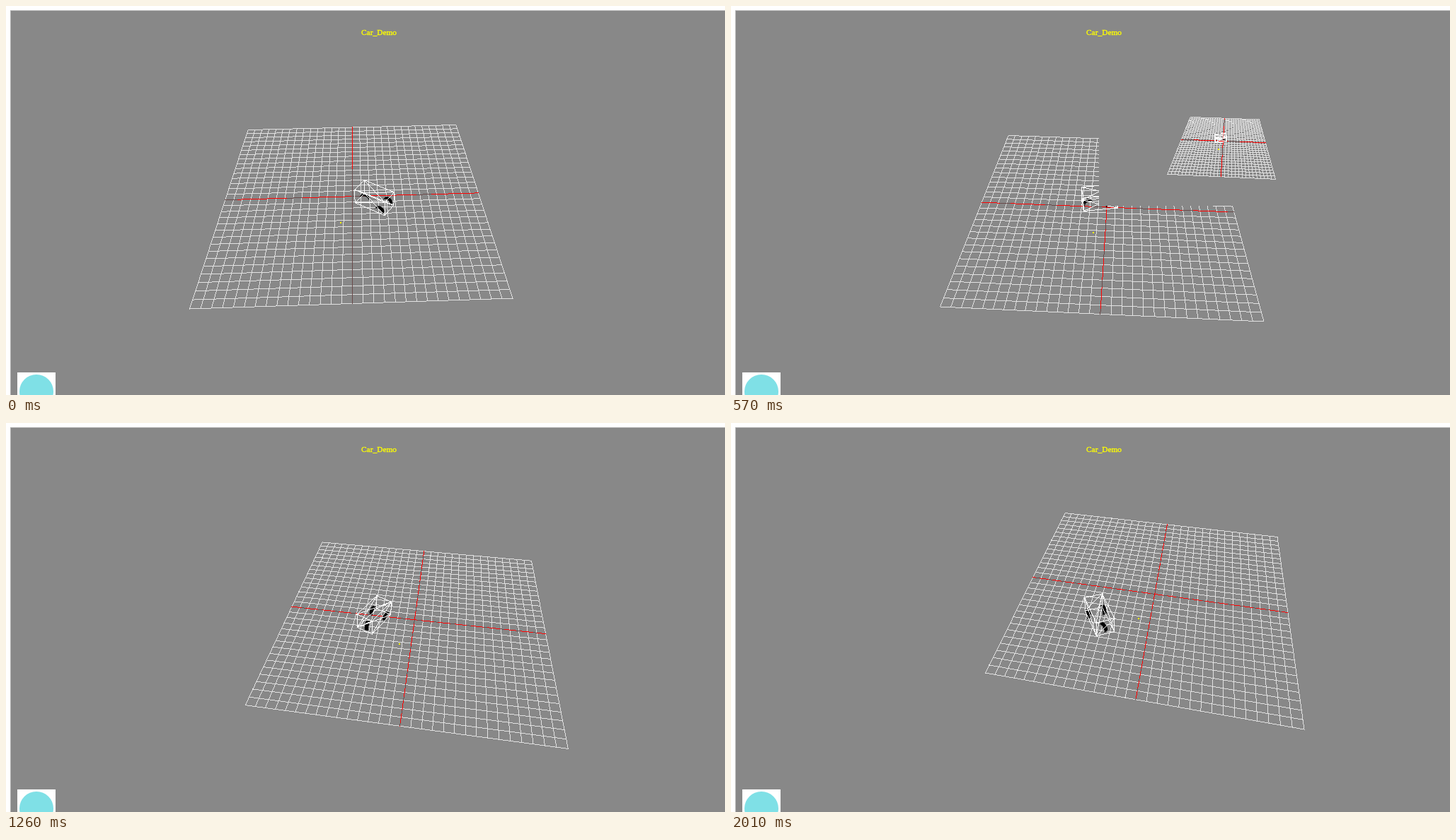
These frames come from a looping animation (1016 px wide and 551 px high, 2.04 s). An HTML page with a canvas:

```html
<!DOCTYPE html>
<html lang="en">
<head>
<meta charset="utf-8">
<title>Car_Demo</title>
<style>
  html, body { margin: 0; width: 100%; height: 100%; overflow: hidden; background: #fff; }
  canvas { display: block; }
</style>
</head>
<body>
<canvas id="stage" width="1016" height="551"></canvas>
<script>
const ctx = document.getElementById('stage').getContext('2d');
const LOOP = 2040, STEP = 30, HALF = 15;
const GREY = '#888', WHITE = '#fff', PALE = '#e2e2e2', RED = '#f00', DIM = '#6a4a4a';
const FOCAL = 594, CX = 520, CY = 283;
const INSET = { from: 570, to: 1260, x: 520, y: 98, w: 343, h: 185 };

// time, then ground corners: far left, far right, near right, near left
const KEYS = [
  [0,    341.5, 175, 635.5, 168, 715.5, 413.5, 259, 428.5],
  [360,  370.5, 182, 661.5, 184, 737.5, 435.5, 279, 430.5],
  [570,  391.5, 183, 683.5, 193, 752.5, 446.5, 295, 425.5],
  [1080, 433.5, 174, 730.5, 197, 784.5, 459.5, 328, 407.5],
  [1440, 457.5, 161, 751.5, 190, 801.5, 459.5, 346, 389.5],
  [1770, 470.5, 142, 769.5, 176, 810.5, 447.5, 358, 368.5],
  [2010, 471.5, 127, 771.5, 161, 809.5, 433.5, 359, 353.5]
];

function slope(i, c) {
  const a = KEYS[Math.max(i - 1, 0)], b = KEYS[Math.min(i + 1, KEYS.length - 1)];
  return (b[c] - a[c]) / (b[0] - a[0]);
}

// Hermite curve through the keys
function cornersAt(t) {
  let i = 0;
  while (i < KEYS.length - 2 && t >= KEYS[i + 1][0]) i++;
  const a = KEYS[i], b = KEYS[i + 1], span = b[0] - a[0];
  const s = Math.min(1, (t - a[0]) / span), r = 1 - s;
  return a.slice(1).map((v, k) => {
    const c = k + 1;
    return v * (1 + 2 * s) * r * r + b[c] * s * s * (3 - 2 * s)
      + span * (slope(i, c) * s * r * r - slope(i + 1, c) * s * s * r);
  });
}

const cross = (a, b) => [
  a[1] * b[2] - a[2] * b[1], a[2] * b[0] - a[0] * b[2], a[0] * b[1] - a[1] * b[0]
];
const toCamera = ([x, y, w]) => [(x - CX * w) / FOCAL, (y - CY * w) / FOCAL, w];
const toScreen = ([x, y, z]) => [x * FOCAL + CX * z, y * FOCAL + CY * z, z];

// Camera from the four corners; the up vector is normal to the ground
function makeCamera([x0, y0, x1, y1, x2, y2, x3, y3]) {
  const sx = x0 - x1 + x2 - x3, sy = y0 - y1 + y2 - y3;
  const ax = x1 - x2, ay = y1 - y2, bx = x3 - x2, by = y3 - y2;
  const det = ax * by - bx * ay;
  const g = (sx * by - bx * sy) / det, h = (ax * sy - sx * ay) / det;
  const size = 2 * HALF;
  const u = [x1 - x0 + g * x1, y1 - y0 + g * y1, g].map(n => n / size);
  const v = [x3 - x0 + h * x3, y3 - y0 + h * y3, h].map(n => n / size);
  const cv = toCamera(v);
  const up = toScreen(cross(cv, toCamera(u)).map(n => n / Math.hypot(...cv)));
  const base = [x0, y0, 1];

  const project = (gx, gy, z = 0) => {
    const [x, y, w] = base.map((n, k) => n + u[k] * (gx + HALF) + v[k] * (gy + HALF) + up[k] * z);
    return [x / w, y / w];
  };
  // ground point under a screen point
  const ground = (x, y) => {
    const row = (k, p) => [u[k] - p * u[2], v[k] - p * v[2], p - base[k]];
    const [a, b, e] = row(0, x), [c, d, f] = row(1, y), k = a * d - b * c;
    return [(e * d - b * f) / k - HALF, (a * f - e * c) / k - HALF];
  };
  return { project, ground };
}

// Hard-edged line, drawn in runs; ink may depend on the minor coordinate
function line(p, q, ink = () => WHITE) {
  const steep = Math.abs(q[1] - p[1]) > Math.abs(q[0] - p[0]);
  const m = steep ? 1 : 0, n = 1 - m;
  if (p[m] > q[m]) [p, q] = [q, p];
  const from = Math.round(p[m]), to = Math.round(q[m]);
  const k = (q[n] - p[n]) / (q[m] - p[m] || 1);
  let start = from, row = null, color = null;
  const flush = end => {
    if (row === null) return;
    ctx.fillStyle = color;
    if (steep) ctx.fillRect(row, start, 1, end - start);
    else ctx.fillRect(start, row, end - start, 1);
  };
  for (let i = from; i <= to; i++) {
    const pos = p[n] + (i - p[m]) * k, r = Math.round(pos), c = ink(pos);
    if (r !== row || c !== color) {
      flush(i);
      start = i; row = r; color = c;
    }
  }
  flush(to + 1);
}

const gridInk = () => PALE;
const axisInk = pos => {
  const f = pos % 2.5;
  return f > 1.15 && f < 1.75 ? DIM : RED;
};

function drawGrid(at) {
  for (let i = -HALF; i <= HALF; i++) {
    if (!i) continue;
    line(at(i, -HALF), at(i, HALF), gridInk);
    line(at(-HALF, i), at(HALF, i), gridInk);
  }
  line(at(-HALF, 0), at(HALF, 0), axisInk);
  line(at(0, -HALF), at(0, HALF), axisInk);
}

// Open tyre: only the outer wall that faces the viewer is filled
function drawWheel(at, along, side, turn) {
  const R = 0.55, W = 0.22, N = 14, c = Math.cos(turn), s = Math.sin(turn);
  const rim = (i, w) => {
    const a = i / N * 2 * Math.PI, r = R * Math.cos(a);
    return at(along + r * c - w * s, side + r * s + w * c, R + R * Math.sin(a));
  };
  ctx.fillStyle = '#000';
  ctx.beginPath();
  for (let i = 0; i < N; i++) {
    const quad = [rim(i, -W), rim(i + 1, -W), rim(i + 1, W), rim(i, W)];
    const area = quad.reduce((sum, p, k) => {
      const q = quad[(k + 1) % 4];
      return sum + p[0] * q[1] - q[0] * p[1];
    }, 0);
    if (area > 0) continue;
    quad.forEach((p, k) => k ? ctx.lineTo(...p) : ctx.moveTo(...p));
    ctx.closePath();
  }
  ctx.fill();
}

function drawCar(at) {
  drawWheel(at, 1.25, -0.9, 0);
  drawWheel(at, 1.25, 0.9, 0);
  drawWheel(at, -1.3, 0, -0.35);
  const corner = i => at(i & 1 ? 2 : -2, i & 2 ? 1 : -1, i & 4 ? 2.35 : 0.35);
  for (let i = 0; i < 8; i++)
    for (const bit of [1, 2, 4])
      if (!(i & bit)) line(corner(i), corner(i | bit));
  for (const [a, b] of [[0, 3], [4, 7], [0, 5], [2, 7], [0, 6], [1, 7]])
    line(corner(a), corner(b));
}

function drawScene(camera, t, view) {
  const at = (x, y, z) => view(camera.project(x, y, z));
  drawGrid(at);
  const [px, py] = camera.ground(CX, CY);
  const [ex, ey] = camera.ground(CX + 1, CY);
  const heading = (32 - 0.07 * t) * Math.PI / 180 + Math.atan2(ey - py, ex - px);
  const c = Math.cos(heading), s = Math.sin(heading);
  drawCar((along, side, z) => at(px + along * c - side * s, py + along * s + side * c, z));
  const [dx, dy] = at(-1.25, 4.4, 0).map(Math.round);
  ctx.fillStyle = '#ff0';
  ctx.fillRect(dx - 1, dy - 1, 2, 2);
}

function drawOverlay() {
  ctx.fillStyle = ctx.strokeStyle = '#ff0';
  ctx.lineWidth = 0.35;
  ctx.font = '11.4px "Liberation Serif", serif';
  ctx.textAlign = 'center';
  ctx.fillText('Car_Demo', 527, 41);
  ctx.strokeText('Car_Demo', 527, 41);
  ctx.fillStyle = WHITE;
  ctx.fillRect(16, 519, 54, 32);
  ctx.fillStyle = '#7fe0e6';
  ctx.beginPath();
  ctx.arc(43, 546, 24, 0, 2 * Math.PI);
  ctx.fill();
}

function draw(t) {
  ctx.fillStyle = WHITE;
  ctx.fillRect(0, 0, 1016, 551);
  ctx.fillStyle = '#b0b0b0';
  ctx.fillRect(6, 6, 1010, 545);
  ctx.fillStyle = GREY;
  ctx.fillRect(7, 7, 1009, 544);
  const camera = makeCamera(cornersAt(t));
  drawScene(camera, t, p => p);
  if (t >= INSET.from && t < INSET.to) {
    ctx.fillStyle = GREY;
    ctx.fillRect(INSET.x, INSET.y, INSET.w, INSET.h);
    drawScene(camera, t, ([x, y]) => [x / 3 + 518, y / 3 + 96]);
  }
  drawOverlay();
}

const begin = performance.now();
let shown = -1;
function tick() {
  const t = Math.floor((performance.now() - begin) % LOOP / STEP) * STEP;
  if (t !== shown) draw(shown = t);
  requestAnimationFrame(tick);
}
tick();
</script>
</body>
</html>
```
